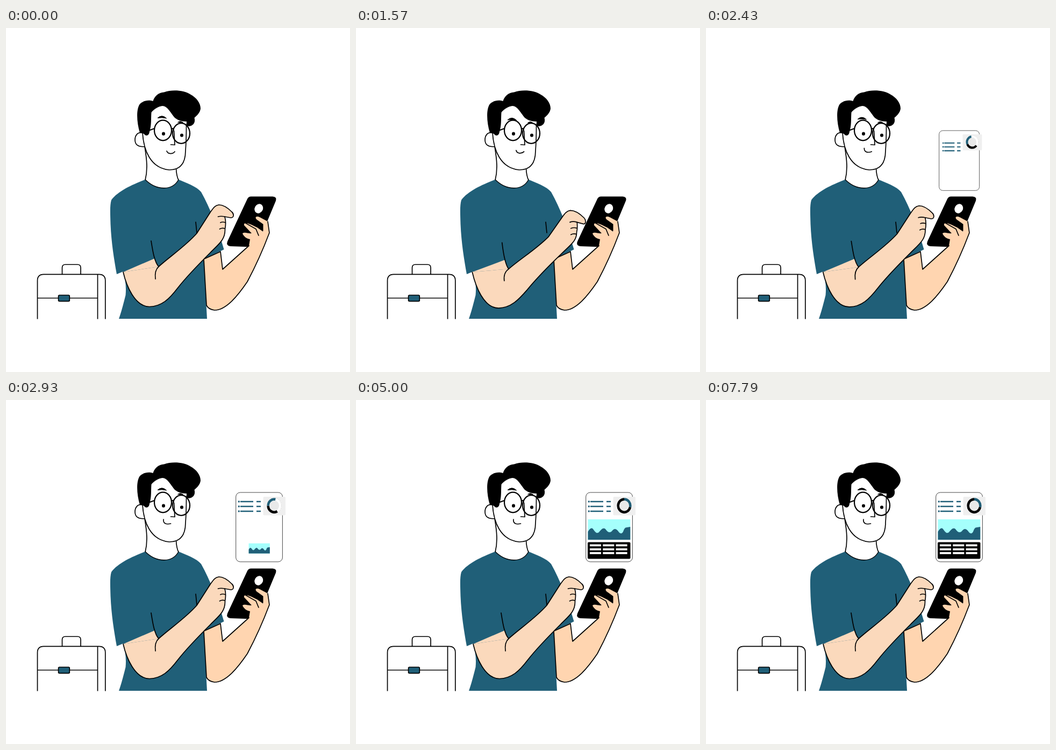
Animation, 640 px wide and 640 px high, one loop 9570 ms. Source, as an HTML page:

```html
<!DOCTYPE html>
<html lang="en">
<head>
<meta charset="utf-8">
<title>Man with phone</title>
<style>
html, body { margin: 0; width: 100%; height: 100%; overflow: hidden; background: #fff; }
svg { display: block; width: 100vw; height: 100vh; }
.line { fill: none; stroke: #000; stroke-width: 1.7; stroke-linecap: round; stroke-linejoin: round; }
.teal { fill: #205f78; }
.skin { fill: #ffd5b0; }
</style>
</head>
<body>
<svg viewBox="0 0 640 640">
  <g id="briefcase" class="line" style="stroke-linecap:butt">
    <path d="M58.5 541.5V470Q58.5 458.3 70 458.3H173Q184.8 458.3 184.8 470V541.5M170.5 458.3V541.5M58.5 502.5H170.5"/>
    <path d="M104.5 458V446Q104.5 440 110.5 440H133Q139 440 139 446V458"/>
    <rect x="97.5" y="497" width="20.8" height="11.3" rx="2" style="fill:#205f78"/>
  </g>

  <g id="head">
    <path class="line" d="M258 220C262 245 264 263 259 283M316.500 262C317 270 318 277 321 283"/>
    <path class="line" d="M254 195C244 193 240 201 240 208C240 217 246 222 258 220.500"/>
    <path class="line" style="fill:#fff" d="M254 195C256 226 268 261 304 264C325 264 334 250 334 228C335 215 335.500 200 335.500 180"/>
    <path d="M249 195C243 175 242 151 249 141.500C256 134 267 134 273.500 136C276 127 284 120 294 119.500C310 114 331 116 343 123.500C355 130 362 140 362 150C361 158 355 163 350.500 167C352 173 351 178 346 181C343 183 338 183.500 335.500 181L336 174C326 174 318 171 313 166C306 157 300 145 291 145C284 145.500 275 151 270.500 157C269.500 170 271 180 267 193C266 200 262 201 258.500 199Q256 195 249 195Z"/>
    <path id="browLeft" d="M282 167.500Q290 160 298.500 168Q290 166 282 167.500Z" stroke="#000"/>
    <path id="browRight" d="M319.500 175.500Q325 171.500 330 176.500Q325 175 319.500 175.500Z" stroke="#000"/>
    <g class="line" style="stroke-width:2.2">
      <ellipse cx="292" cy="190.500" rx="16" ry="18.800"/>
      <ellipse cx="326" cy="196" rx="16" ry="18.800"/>
      <path d="M308 188Q310 186 312 188.500M276 187L265 191"/>
    </g>
    <ellipse class="pupil" cx="293" cy="196.800" rx="3"/>
    <ellipse class="pupil" cx="327" cy="199.600" rx="3"/>
    <path class="line" d="M312.500 191L314 217.500L306.500 217"/>
    <path id="mouth" class="line"/>
  </g>

  <path class="teal" d="M259 282C238 290 208 303 196 320C193 330 194 345 194.500 365C196 400 201 430 206 458L218 453C222 468 224 480 222.500 497C218 515 214 530 210 541H374L368 430L405.500 412C395 375 380 335 363 305C355 295 335 288 321 282C310 303 280 303 259 282Z"/>
  <path class="line" style="stroke-width:1.3" d="M259 282C280 303 310 303 321 282"/>
  <path class="line" d="M353 361L355 381"/>

  <g id="phoneArm">
    <path d="M456 313.500H496Q504.500 314 502 321.500L468 403Q466 407.500 460 407.500L417 406Q409 405 412 397L449 318Q451 313.500 456 313.500Z"/>
    <ellipse cx="470.300" cy="336" rx="7.600" ry="9" transform="rotate(30 470.300 336)" fill="#fff"/>
    <path class="skin" d="M368 430L399 416L403 449L452 405L454 393C448 392 442 388 440 382C445 379 450 383 457 382L443 367C442 361 448 361 467 371L478.500 379V365L466 356C462 351 467 349.500 472 352L487 360L490 381C481 405 466 440 449 472C432 497 410 525 388 525C380 524 375 520 373 516Z"/>
    <path class="line" d="M368 430L373 516C375 520 380 524 388 525C410 525 432 497 449 472C466 440 481 405 490 381L487 360M368 430L399 416L403 449L452 405M444 362L465 374L470 386"/>
  </g>

  <g id="tapArm">
    <path id="armpit" fill="#fbd9bc"/>
    <path id="forearm" class="line" style="fill:#fbd9bc"/>
    <path id="creases" class="line"/>
  </g>

  <g id="card">
    <rect x="427.700" y="172" width="86.700" height="129" rx="8" fill="#fff" stroke="#333" stroke-width=".9"/>
    <rect x="478.500" y="180" width="41.500" height="34.500" rx="2" fill="#efefef"/>
    <g transform="translate(499 196.700) scale(1 1.070)" fill="none" stroke-width="4.500">
      <circle r="11.300" fill="#e9e9e9" stroke="#fff"/>
      <circle r="13.300" stroke="#bbb" stroke-width=".5" stroke-dasharray="2 1.500"/>
      <path id="ringBlack" stroke="#000"/>
      <path id="ringTeal" stroke="#205f78"/>
    </g>
  </g>
  <g id="list"></g>
  <g id="wave">
    <rect x="431.500" y="222" width="78.800" height="38" fill="#a5fffc"/>
    <path class="teal" d="M431.500 245C435 239 438 237 441 240C446 247 448 249 452 246C457 240 460 237 464 240C468 246 472 248 476 244C480 239 483 239 487 243C491 249 494 250 497 245C499 240 500 237 504 237L510.300 236V260H431.500Z"/>
  </g>
  <g id="table"><rect x="431" y="264.500" width="79.500" height="31" rx="2"/></g>
</svg>
<script>
const LOOP = 9570, FPS = 14;
const $ = id => document.getElementById(id);
const smooth = x => x * x * (3 - 2 * x);

// Each path as a pair of end poses with the same commands.
const ARMPIT = ['M218 454L276 429L284 444Z', 'M216 454L276.5 432L284 449Z'];
const FOREARM = [
  'M218 454C224 480 240 518.5 267 518.5C290 518 304 504 320 483C338 460 360 438 380 418C398 400 408 393 407.5 374C409 366 409 358 407 351L418 353C424.5 353 424.5 346 420 342C412 334 405 329 396 329C388 330 385 336 380 343L355 382C335 405 305 425 284 444',
  'M216 454C222 480 237 521.5 265 521.5C288 521 302 506 318 488C338 464 361 441 381 422C400 403 411 397 411 381C413 374 412 368 412 363L424 366.5C428.5 367 429 359 425 355C416 346 408 341 399 341C392 342 388 348 383 355L359 389C336 412 306 430 284 449'];
const CREASES = [
  'M284 444Q276 451 278 467M270 396C273 415 276 435 284 444M394.5 351Q400 349.5 407 351M399 362Q403 360 408 362M397.5 374Q402 371.5 407 373',
  'M284 449Q273.5 456 275.5 471M272 400C274 418 277 440 284 449M398.5 363Q404 360.5 412 363M400 374.5Q406 372 411 374M400 386Q405 383.5 410 385'];
const MOUTH = ['M299 228.8C301 235 310 235 314 230', 'M293 222C292 230 298 232 306.5 230'];

// Sets a path between its two poses, q running from 0 to 1.
function morph(id, [a, b], q) {
  const goal = b.match(/[\d.]+/g);
  let i = 0;
  $(id).setAttribute('d', a.replace(/[\d.]+/g, n => +n + (goal[i++] - n) * q));
}

// Eased value through [time, value] keys, held beyond both ends.
function track(t, ...keys) {
  const i = keys.findIndex(k => t < k[0]);
  if (i === 0) return keys[0][1];
  if (i < 0) return keys[keys.length - 1][1];
  const [t0, v0] = keys[i - 1], [t1, v1] = keys[i];
  return v0 + (v1 - v0) * smooth((t - t0) / (t1 - t0));
}

$('list').innerHTML = [189, 198, 207].map(y =>
  `<circle cx="433.300" cy="${y}" r="1.700" class="teal"/>
   <path d="M436 ${y}H460M466 ${y}H474" stroke="#205f78" stroke-width="2.600"/>`).join('');
for (const y of [268.5, 276, 283])
  $('table').innerHTML += [435, 459.3, 483.6].map(x =>
    `<rect x="${x}" y="${y}" width="21" height="3.700" fill="#fff"/>`).join('');

// Pops a part up out of the phone during one second.
function grow(id, t, from) {
  const s = track(t, [from, 0], [from + 1000, 1]);
  $(id).setAttribute('transform', `translate(471.5 311) scale(${s}) translate(-471.5 -311)`);
  $(id).setAttribute('visibility', s > 0 ? 'visible' : 'hidden');
}

function arc(from, to) {
  const point = deg => {
    const a = (deg - 90) * Math.PI / 180;
    return `${11.3 * Math.cos(a)} ${11.3 * Math.sin(a)}`;
  };
  return `M${point(from)}A11.3 11.3 0 ${to - from > 180 ? 1 : 0} 1 ${point(to)}`;
}

function draw(t) {
  const tap = track(t, [0, 0], [1000, 1.12], [2850, 0]);
  morph('armpit', ARMPIT, tap);
  morph('forearm', FOREARM, tap);
  morph('creases', CREASES, tap);
  morph('mouth', MOUTH, track(t, [1000, 0], [3071, 1]));

  const brow = track(t, [0, 0], [2000, 4], [2930, 0]);
  $('browLeft').setAttribute('transform', `translate(0 ${brow})`);
  $('browRight').setAttribute('transform', `translate(0 ${brow / 4})`);

  const open = Math.min(...[2000, 6320, 7510].map(c =>
    track(Math.abs(t - c), [0, 0.45], [300, 1])));
  document.querySelectorAll('.pupil').forEach(p => p.setAttribute('ry', 3.2 * open));

  grow('card', t, 1660);
  grow('list', t, 1720);
  grow('wave', t, 2430);
  grow('table', t, 3340);

  const turn = 270 + 45 * (Math.min(t, 5000) - 2930) / 1035;
  const black = track(t, [2930, 120], [4000, 135], [5000, 258]);
  $('ringBlack').setAttribute('d', arc(turn - black, turn));
  $('ringTeal').setAttribute('d', arc(turn, turn + 102));
}

const begin = performance.now();
function tick() {
  const t = (performance.now() - begin) % LOOP;
  draw(Math.floor(t * FPS / 1000 + 0.05) * 1000 / FPS);
  requestAnimationFrame(tick);
}
tick();
</script>
</body>
</html>
```
